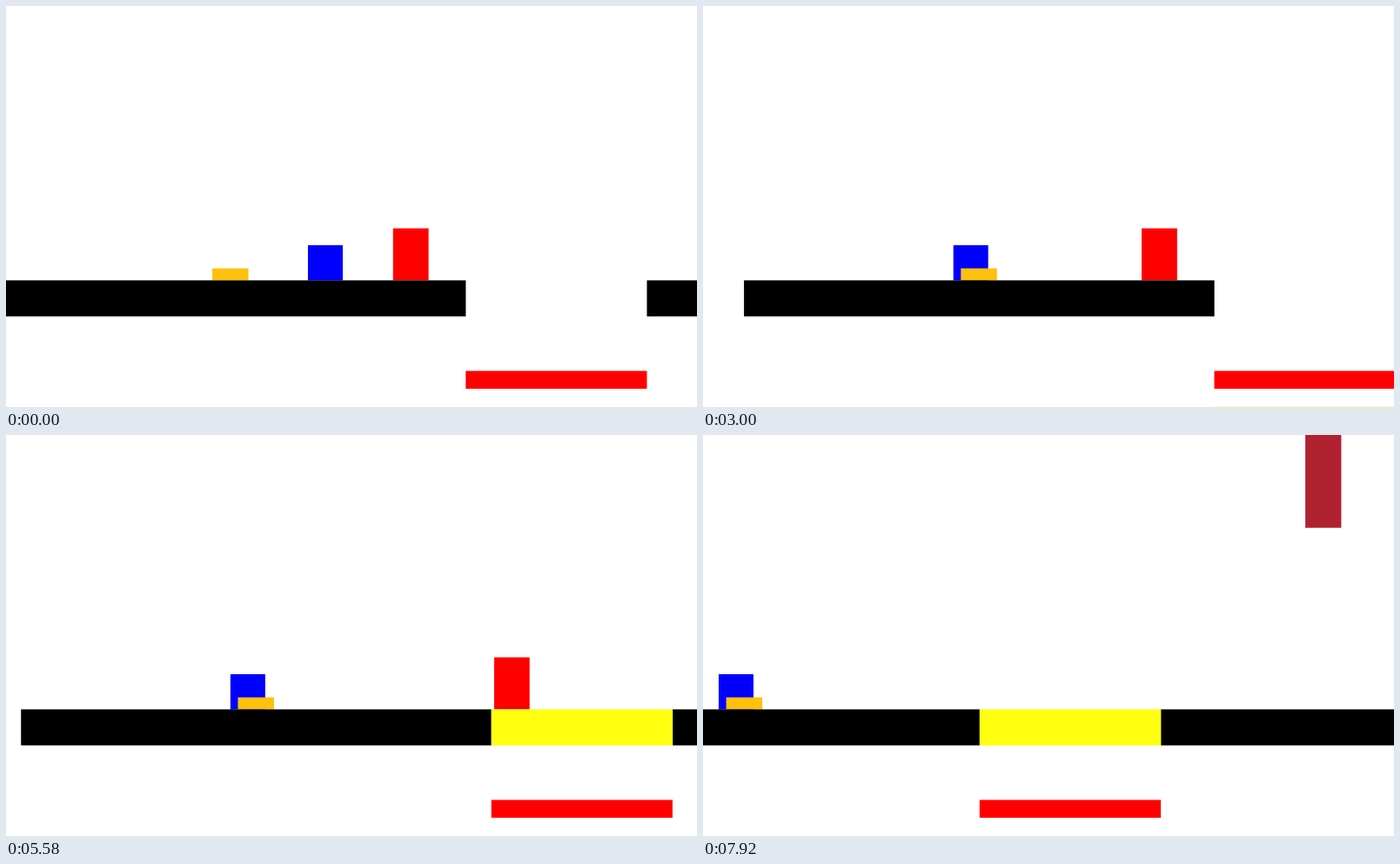
Animation of 794x461 px, one loop 8000 ms. Source, as an HTML page with a canvas:

```html
<!DOCTYPE html>
<html lang="en">
<head>
<meta charset="utf-8">
<title>Block platformer</title>
<style>
  html, body { margin: 0; width: 100%; height: 100%; overflow: hidden; background: #fff; }
  canvas { display: block; }
</style>
</head>
<body>
<canvas id="stage" width="794" height="461"></canvas>
<script>
const ctx = document.getElementById('stage').getContext('2d');
const LOOP = 8000;
const STEP = 1000 / 12;
const REST = 587.5;   // ledge position while the camera rests
const GAP = 208.2;
const WINDOW = 290;   // ms of walking that the camera averages
const SAMPLES = 16;

const clamp = (v, lo, hi) => Math.min(hi, Math.max(lo, v));
const ramp = (t, t0, t1, dist) => dist * clamp((t - t0) / (t1 - t0), 0, 1);

// Distance walked by each block: a short step left, right, then the run back left
const blueWalk = t =>
  118.5 + ramp(t, 0, 150, -6.5) + ramp(t, 450, 600, 27.5) + ramp(t, 1355, 2020, -139.5);

const redWalk = t =>
  ramp(t, 5117, 5580, 86) + ramp(t, 5580, 6330, 159) + ramp(t, 6330, LOOP, 341);

// The camera follows half of the recent average walk.
function ledge(t) {
  let sum = 0;
  for (let i = 0; i < SAMPLES; i++) {
    const past = t - WINDOW * (i + 0.5) / SAMPLES;
    sum += blueWalk(past) + redWalk(past);
  }
  return REST - sum / SAMPLES / 2;
}

function box(color, x, y, w, h) {
  ctx.fillStyle = color;
  ctx.fillRect(x, y, w, h);
}

function draw(t) {
  const x = ledge(t);
  const lift = Math.max(315.4, 460.6 - (t - 3000) * 0.0825);

  box('#fff', 0, 0, 794, 461);
  box('#b02230', x + 374.3, 0, 41.3, 106.7);
  box('#00f', x - 299.8 + blueWalk(t), 275, 40, 40.5);
  box('#f00', x - 83.5 + redWalk(t), 255.6, 40.8, 59.8);
  box('#ffc00e', x - 291.2, 301.6, 41.5, 13.8);
  box('#000', x - 540.4, 315.4, 540.5, 41.4);
  box('#000', x + GAP, 315.4, 800, 41.4);
  box('#f00', x, 419.5, GAP, 20.5);
  box('#ffff10', x, lift, GAP + 0.3, 41.4);
}

const start = performance.now();
function frame() {
  const t = (performance.now() - start) % LOOP;
  draw(Math.floor((t + 5) / STEP) * STEP);
  requestAnimationFrame(frame);
}
frame();
</script>
</body>
</html>
```
